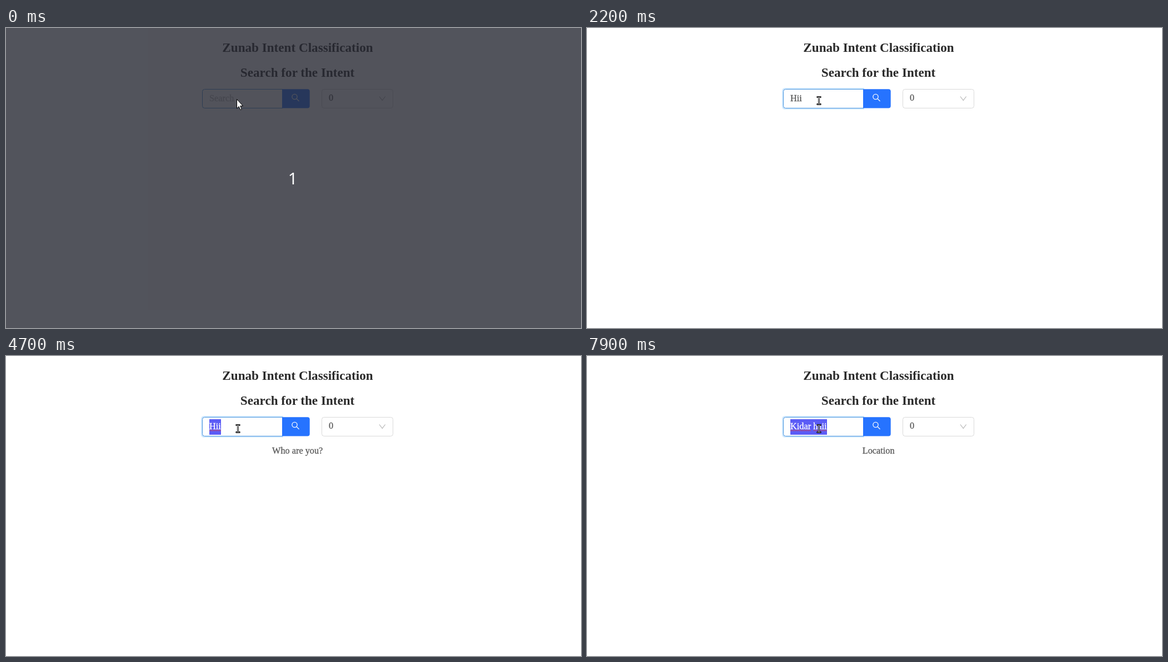
Animation, 1035 px wide and 541 px high, one loop 8 s. Source, as an HTML page:

```html
<!DOCTYPE html>
<html lang="en">
<head>
<meta charset="utf-8">
<title>Intent search</title>
<style>
  html, body { margin: 0; width: 100%; height: 100%; overflow: hidden; background: #fff; }
  svg { display: block; }
  text { font: 16.3px "Liberation Serif", serif; fill: #595959; stroke: #595959; stroke-width: .3px; white-space: pre; }
  .heading { font-size: 23.15px; font-weight: bold; fill: #2a2a2a; stroke: none; }
  .mid { text-anchor: middle; }
  #hint { fill: #bfbfbf; stroke: #bfbfbf; }
  #typed.selected { fill: #fff; stroke: #fff; }
  #count { font: 29.5px "Noto Sans", sans-serif; fill: #fff; stroke: none; }
</style>
</head>
<body>
<svg width="1035" height="541" viewBox="0 0 1035 541">
  <defs>
    <pattern id="wave" x="366" y="132.5" width="4" height="4" patternUnits="userSpaceOnUse">
      <path d="M-1 0L1 2.5L3 .5L5 2.5" transform="translate(0 .3)" fill="none" stroke="#e0403c"/>
    </pattern>
    <path id="ibeam" d="M415 124.500H416.500L417.500 125.500L418.500 124.500H420M417.500 125.500V136.500M415 137.500H416.500L417.500 136.500L418.500 137.500H420"/>
  </defs>
  <text class="heading mid" x="525" y="43">Zunab Intent Classification</text>
  <text class="heading mid" x="524.6" y="88">Search for the Intent</text>

  <path id="glow" d="M499 109.5H357Q352.5 109.5 352.5 114V141Q352.5 145.5 357 145.5H499" fill="none" stroke="#1890ff" stroke-opacity=".2" stroke-width="3"/>
  <path d="M498 110.5H357.5Q353.5 110.5 353.5 114.5V140.5Q353.5 144.5 357.5 144.5H498" fill="#fff" stroke="#4a94dc"/>
  <path d="M497 110.3H542.7Q546.7 110.3 546.7 114.3V140.6Q546.7 144.6 542.7 144.6H497Z" fill="#2673ff"/>
  <g fill="none" stroke="#fff" stroke-width="1.3">
    <circle cx="519.5" cy="124" r="4.6"/>
    <path d="M522.800 127.400L527.500 132"/>
  </g>
  <rect x="568.5" y="110.5" width="128" height="34" rx="4" fill="#fff" stroke="#d9d9d9"/>
  <text x="581" y="131">0</text>
  <path d="M672 123.500L677.300 130.500L682.600 123.500" fill="none" stroke="#b5b5b5" stroke-width="1.2"/>

  <rect id="selection" x="366" y="114" height="28" fill="#5b5cf6"/>
  <text id="hint" x="366" y="132">Search</text>
  <text id="typed" x="366" y="132"></text>
  <rect class="mark" y="132.5" height="4" fill="url(#wave)"/>
  <rect class="mark" y="132.5" height="4" fill="url(#wave)"/>
  <rect id="caret" y="114" width="1" height="28" fill="#333"/>
  <text id="answer" class="mid" x="524.7" y="176"></text>

  <g id="beam" fill="none">
    <use href="#ibeam" stroke="#000" stroke-width="2.8" stroke-linecap="square"/>
    <use href="#ibeam" stroke="#fff" stroke-width="1"/>
  </g>
  <g id="overlay">
    <rect width="1035" height="541" fill="#272933" fill-opacity=".8"/>
    <path d="M415.500 128.500V145L419.200 141.500L421.800 147.500L424.200 146.500L421.700 140.500H426.500Z" fill="#fff" stroke="#000"/>
    <text id="count" class="mid" x="516.3" y="281.5">1</text>
  </g>
</svg>
<script>
const LOOP = 8000, LEFT = 366;
const el = id => document.getElementById(id);
const typed = el('typed'), marks = document.querySelectorAll('.mark');
const start = { overlay: true, glow: 0, text: '', caret: false, marked: 0, answer: '', selected: false };

// Each entry changes only the listed parts of the state.
const events = [
  [400, { overlay: false, caret: true }],
  [500, { glow: .5 }],
  [600, { glow: 1 }],
  [1000, { caret: false }],
  [1200, { text: 'H', caret: true }],
  [1400, { text: 'Hi' }],
  [1600, { text: 'Hii' }],
  [2200, { caret: false }],
  [2600, { marked: 1, answer: 'Who are you?' }],
  [2700, { caret: true }],
  [3300, { caret: false }],
  [3700, { selected: true }],
  [5200, { text: 'K', selected: false, marked: 0, caret: true }],
  [5300, { text: 'Ki' }],
  [5500, { text: 'Kid' }],
  [5700, { text: 'Kida' }],
  [5800, { text: 'Kidar' }],
  [6000, { text: 'Kidar ', marked: 1 }],
  [6100, { text: 'Kidar h' }],
  [6200, { text: 'Kidar ha' }],
  [6400, { text: 'Kidar hai' }],
  [6500, { text: 'Kidar haii' }],
  [7000, { answer: 'Location' }],
  [7100, { caret: false }],
  [7500, { marked: 2 }],
  [7600, { caret: true }],
  [7900, { selected: true, caret: false }]
];

function show(node, on) { node.style.display = on ? '' : 'none'; }

function widthOf(text) {
  typed.textContent = text;
  return text ? typed.getComputedTextLength() : 0;
}

function draw(s) {
  show(el('overlay'), s.overlay);
  show(el('beam'), !s.overlay);
  show(el('hint'), !s.text);
  show(el('caret'), s.caret);
  show(el('selection'), s.selected);
  el('glow').style.opacity = s.glow;
  el('answer').textContent = s.answer;
  typed.classList.toggle('selected', s.selected);

  const words = s.text.split(' ');
  marks.forEach((mark, i) => {
    show(mark, i < s.marked);
    if (i >= s.marked) return;
    const from = i ? widthOf(words[0] + ' ') : 0;
    mark.setAttribute('x', LEFT + from);
    mark.setAttribute('width', widthOf(words.slice(0, i + 1).join(' ')) - from);
  });
  const width = widthOf(s.text);
  el('caret').setAttribute('x', Math.round(LEFT + width));
  el('selection').setAttribute('width', Math.round(width));
}

let shown = -1;
function tick() {
  const t = performance.now() % LOOP;
  const past = events.filter(([time]) => time <= t);
  if (past.length !== shown) {
    shown = past.length;
    draw(Object.assign({}, start, ...past.map(e => e[1])));
  }
  requestAnimationFrame(tick);
}
tick();
</script>
</body>
</html>
```
